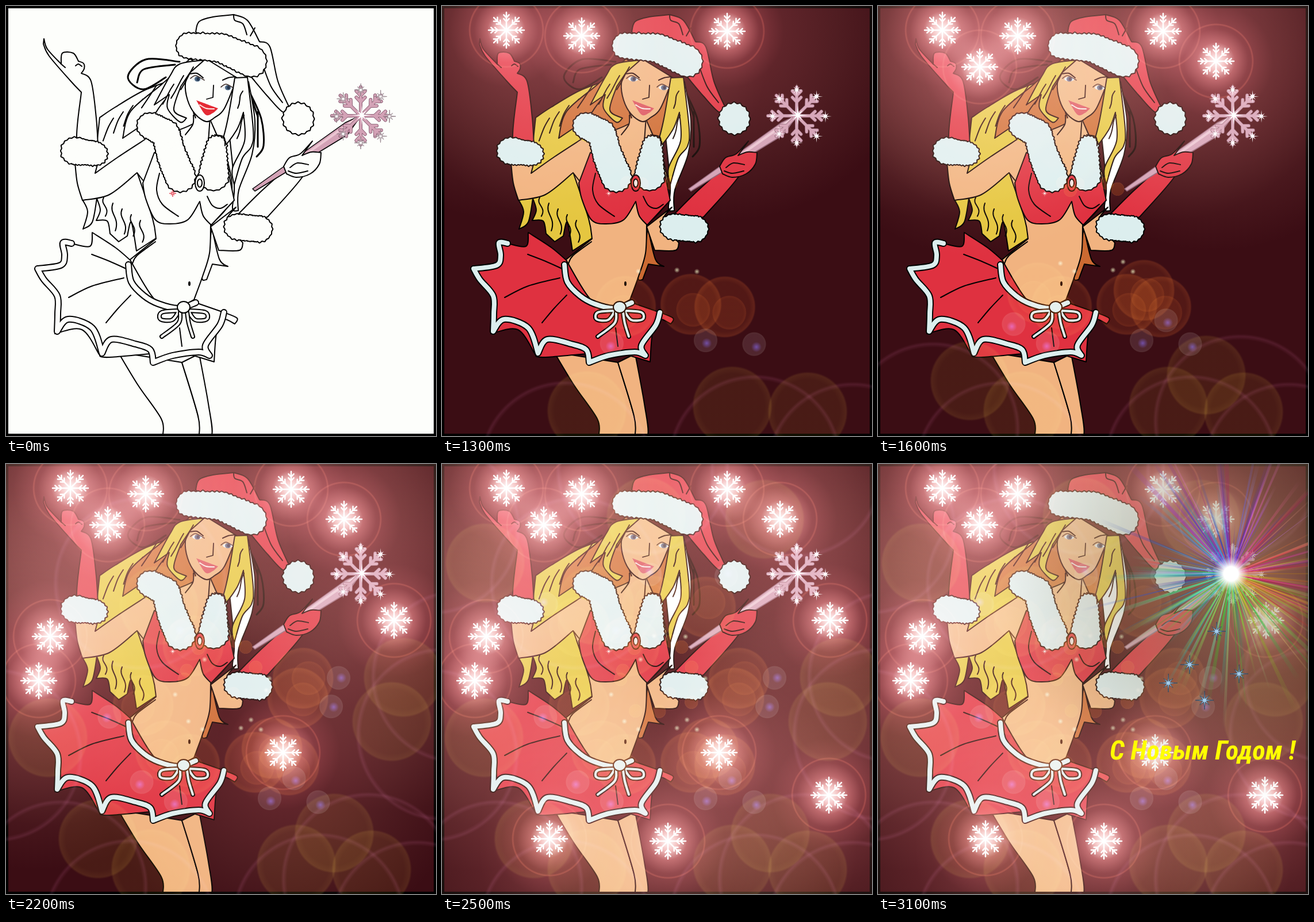
These frames come from a looping animation (748 by 748 pixels, 5.1 s). An HTML page with a canvas:

```html
<!DOCTYPE html>
<html lang="ru">
<head>
<meta charset="utf-8">
<title>С Новым Годом</title>
<style>
html, body { margin: 0; width: 100%; height: 100%; overflow: hidden; background: #000; }
#stage { position: fixed; inset: 0; overflow: hidden; }
canvas { display: block; width: 748px; height: 748px; }
#wish { position: absolute; left: 403px; top: 473px; line-height: 50px; white-space: nowrap; color: #ff0;
  font-family: "Roboto Condensed", "Open Sans Condensed", "Open Sans", sans-serif;
  font-style: italic; font-weight: 700; font-size: 40px; visibility: hidden; }
</style>
</head>
<body>
<div id="stage">
  <canvas width="748" height="748"></canvas>
  <div id="wish">С Новым Годом !</div>
</div>
<script>
const S = 748, LOOP = 5100, FIRST = 1000, STEP = 300, LAST = 8;
const BURST = 7;
const lit = [0, 0, 3, 5, 7, 9, 12, 12];
// Lit from the top of the picture downwards.
const flakes = [[112, 42], [243, 52], [496, 44], [588, 96], [177, 106], [675, 272], [77, 300],
  [57, 377], [482, 502], [673, 576], [187, 652], [393, 656]];
const RED = '#df3140', FUR = '#dceeee', SKIN = '#f1b380', GOLD = '#e5c640', BROWN = '#cb6a32';
const TAU = Math.PI * 2;
let g, inked, seed;

const rnd = () => (seed = (seed * 16807) % 2147483647) / 2147483647;
const tone = c => inked ? c : '#fdfefb';
const mix = (a, b, t) => a + (b - a) * t;

function points(s) {
  const n = s.trim().split(/\s+/).map(Number), out = [];
  for (let i = 0; i < n.length; i += 2) out.push([n[i], n[i + 1]]);
  return out;
}

// Smooth path through "x y x y"; a bar makes the point before it a sharp corner.
function trace(s) {
  const p = new Path2D();
  let last = null;
  for (const part of s.split('|')) {
    const r = points(part);
    if (last) r.unshift(last); else p.moveTo(...r[0]);
    last = r[r.length - 1];
    for (let i = 0; i + 1 < r.length; i++) {
      const a = r[i - 1] || r[i], b = r[i], c = r[i + 1], d = r[i + 2] || c;
      p.bezierCurveTo(b[0] + (c[0] - a[0]) / 6, b[1] + (c[1] - a[1]) / 6,
        c[0] - (d[0] - b[0]) / 6, c[1] - (d[1] - b[1]) / 6, c[0], c[1]);
    }
  }
  return p;
}

function line(s, w = 2, color = '#000') {
  g.lineWidth = w;
  g.strokeStyle = color;
  s.split('/').forEach(t => g.stroke(trace(t)));
}

function shape(s, fill, w = 2) {
  const p = trace(s);
  p.closePath();
  g.fillStyle = tone(fill);
  g.fill(p);
  if (w) { g.lineWidth = w; g.strokeStyle = '#000'; g.stroke(p); }
}

function band(s, w) {
  line(s, w + 4);
  line(s, w, tone(FUR));
}

// Ragged discs strung along a spine, outlined as one.
function fur(s, r0, r1) {
  const spine = points(s), tufts = [], n = (spine.length - 1) * 7;
  for (let i = 0; i <= n; i++) {
    const k = Math.min(Math.floor(i / 7), spine.length - 2), t = i / 7 - k;
    const [a, b] = [spine[k], spine[k + 1]], r = mix(r0, r1, i / n), p = new Path2D();
    for (let q = 0; q < 32; q++) {
      const d = r + (q % 2 ? 0 : 1 + rnd() * 2) - 1.5, v = q / 32 * TAU;
      p.lineTo(mix(a[0], b[0], t) + d * Math.cos(v), mix(a[1], b[1], t) + d * Math.sin(v));
    }
    p.closePath();
    tufts.push(p);
  }
  g.lineWidth = 4;
  g.strokeStyle = '#000';
  tufts.forEach(p => g.stroke(p));
  g.fillStyle = tone(FUR);
  tufts.forEach(p => g.fill(p));
}

function strands(n, x, y, stepX, stepY, dx, dy) {
  g.lineWidth = 2;
  g.strokeStyle = '#000';
  for (let i = 0; i < n; i++) {
    const k = mix(.7, 1.1, rnd()), u = x + stepX * i, v = y + stepY * i;
    g.beginPath();
    g.moveTo(u, v);
    g.bezierCurveTo(u + dx * .1 - 8, v + dy * .4 * k, u + dx * .9 + 9, v + dy * .5 * k, u + dx * k, v + dy * k);
    g.stroke();
  }
}

function oval(x, y, rx, ry, fill, w = 0) {
  g.beginPath();
  g.ellipse(x, y, rx, ry, 0, 0, TAU);
  g.fillStyle = fill;
  g.fill();
  if (w) { g.lineWidth = w; g.strokeStyle = '#000'; g.stroke(); }
}

function flake(x, y, r, color, w) {
  g.strokeStyle = color;
  g.lineWidth = w;
  for (let i = 0; i < 8; i++) {
    g.save();
    g.translate(x, y);
    g.rotate(i * TAU / 8);
    g.beginPath();
    g.moveTo(0, 0);
    g.lineTo(r, 0);
    for (const a of [.48, .7]) {
      g.moveTo(r * (a + .16), -r * .15);
      g.lineTo(r * a, 0);
      g.lineTo(r * (a + .16), r * .15);
    }
    g.stroke();
    g.restore();
  }
}

function star(x, y, r, fill, edge) {
  g.beginPath();
  for (let i = 0; i < 16; i++) {
    const a = i * TAU / 16, q = r * (i % 2 ? .2 : i % 4 ? .72 : 1);
    g.lineTo(x + q * Math.sin(a), y - q * Math.cos(a));
  }
  g.closePath();
  g.fillStyle = fill;
  g.fill();
  if (edge) { g.lineWidth = .8; g.strokeStyle = edge; g.stroke(); }
}

function hairBack() {
  line('302 97 243 93 212 123 238 145 278 124 / 294 102 240 110 228 133', 3);
  line('424 150 444 196 448 243 436 262 / 424 152 438 192 / 438 184 438 245', 3);
  shape('300 125 240 147 190 176 163 194 | 150 300 133 337 | 142 358 134 388 | 150 376 158 335 | 164 355 157 373 | 176 374 181 396 | 196 410 | 211 400 | 218 376 227 426 | 264 402 | 290 200', GOLD);
  strands(4, 238, 162, -17, 11, -22, 48);
  strands(5, 170, 333, 16, 10, 4, 46);
  shape('320 92 270 137 217 183 203 230 | 240 205 | 310 235 380 235 | 394 205 395 140', BROWN);
  strands(2, 262, 138, 14, 26, -24, 36);
  shape('400 125 422 132 | 433 200 428 258 405 320 404 356 | 394 352 397 310 386 200', '#fff');
  shape('358 384 371 440 386 453 | 359 449 | 349 476 | 341 471 354 415', BROWN);
}

function body() {
  shape('195 602 230 660 270 718 273 746 | 336 746 334 713 306 620', SKIN);
  shape('306 620 334 713 336 746 | 358 746 352 692 336 605', SKIN);
  shape('356 384 400 350 | 384 376 412 412 | 406 425 370 425', SKIN);
  shape('326 185 325 205 260 230 | 228 289 | 255 370 261 405 | 216 441 | 222 470 258 510 300 522 327 511 | 342 470 354 430 356 381 | 390 340 388 280 354 195', SKIN);
  shape('120 272 124 308 133 338 | 180 328 228 290 | 250 300 265 250 240 232 | 196 262 155 291 | 160 272', SKIN, 0);
  line('120 272 124 308 133 338 | 180 328 228 290 | 238 303 / 242 232 196 262 155 291 | 160 272');
  line('220 448 228 434 260 410');
  oval(319, 483, 2, 4, '#000');
  shape('258 255 238 308 | 243 335 260 372 285 379 316 372 337 340 | 343 365 357 381 | 397 338 | 384 275 | 350 285', RED);
  shape('318 240 337 315 352 235 354 196 326 196', SKIN, 0);
  line('326 190 325 206 312 224 / 355 193 352 235');
  line('267 291 262 320 272 345 300 366 / 350 331 359 347 373 352 385 345');
}

function skirt() {
  const hem = '114 413 99 412 102 434 95 451 55 457 | 66 476 89 504 90 535 89 566 | 108 545 150 560 167 604 | 183 580 225 588 251 598 256 620 | 290 608 335 602 354 608 | 347 590 372 555 379 533';
  const waist = '213 450 | 218 480 240 504 265 518 300 526 330 516';
  shape(hem + '| 402 543 398 553 | 377 545 366 570 362 619 | 300 600 | 180 611 162 606 | 132 563 85 570 | 100 460', RED);
  shape(hem + '| 330 516 |' + '300 522 260 512 216 442 | 190 420 150 394 | 146 418 114 413', RED);
  line('149 432 180 444 211 458 / 205 473 150 487 109 507 / 217 503 195 526 174 551 / 302 560 306 592');
  band(hem, 8);
  band(waist, 8);
  for (const m of [-1, 1]) {
    const at = (x, y) => `${309 + m * x} ${y} `;
    band(at(8, 530) + at(38, 533) + at(40, 545) + at(20, 546) + at(8, 530), 4);
    band(at(6, 533) + at(9, 552) + at(m < 0 ? 38 : 16, 575), 4);
  }
  oval(309, 524, 11, 10, tone(FUR), 2);
}

function face() {
  shape('321 112 312 135 316 164 329 188 348 201 363 194 380 178 402 125 | 345 90', SKIN);
  line('321 118 332 117 343 125 / 377 129 386 125 399 123');
  for (const [x, y] of [[333, 127], [386, 142]]) {
    oval(x, y, 9, 4, '#e8eef1');
    oval(x, y, 5, 4.5, '#4d6884');
    oval(x + 1, y, 2.5, 3, '#24344a');
    line(`${x - 12} ${y - 1} ${x - 3} ${y - 6} ${x + 12} ${y + 2}`, 1.6, '#3a2a26');
  }
  line('361 138 360 159 | 349 162', 1.8);
  g.fillStyle = inked ? '#d9505c' : '#e52b35';
  g.fill(trace('331 164 342 168 350 171 369 178 | 360 186 347 189 331 164'));
  line('337 172 348 178 362 179', 2, '#fbe8e4');
}

function locks() {
  shape('345 94 302 101 285 122 258 172 | 284 154 | 281 178 303 202 314 195 | 292 181 304 140 | 320 116', GOLD);
  strands(3, 326, 106, -17, 15, -20, 36);
  shape('398 125 386 196 375 236 366 228 | 375 248 401 216 413 185 | 415 235 394 282 397 311 | 411 265 427 244 430 214 420 124', GOLD);
  strands(2, 412, 148, 2, 42, -12, 40);
}

function clothes() {
  fur('250 208 278 222 288 260 303 297', 22, 26);
  fur('366 243 361 295', 17, 26);
  line('363 224 379 228 381 243');
  oval(337, 308, 8, 14, tone(RED), 2);
  oval(337, 308, 4, 7, tone('#f6e2df'), 2);
  shape('66 57 72 75 96 101 | 98 82 117 82 126 96 | 135 100 136 109 131 117 | 148 131 157 195 160 245 | 124 240 131 150 | 112 130 75 87 65 66', RED);
  line('96 101 103 107 / 121 104 126 101 132 105');
  fur('119 252 156 257', 23, 20);
  shape('330 45 336 27 360 19 396 15 | 420 25 441 62 | 459 71 473 131 494 179 | 481 184 455 157 428 125', RED);
  line('396 15 398 25 412 31 419 50 / 433 38 425 52 / 446 101 461 140 481 168');
  fur('318 69 375 73 426 96', 22, 27);
  fur('508 195 509 197', 26, 26);
}

function wand() {
  const edge = inked ? '#8b6274' : '#7a4a62', pink = '#d3a2b6';
  shape('404 362 440 326 484 286 | 520 290 455 367 | 430 375', RED);
  const p = trace('429 318 | 590 203 | 618 190 | 594 224 | 433 322 | 429 318');
  g.fillStyle = pink;
  g.fill(p);
  g.lineWidth = 1.5;
  g.strokeStyle = inked ? edge : '#000';
  g.stroke(p);
  line('500 273 612 194', 4, '#ebc6d2');
  shape('483 279 493 264 512 257 533 235 | 515 260 | 531 254 548 255 | 545 275 529 292 505 298 488 292', RED);
  line('494 281 507 273 526 276 / 491 287 505 291 525 287');
  fur('402 384 441 388', 22, 22);
  flake(617, 191, 50, edge, 6);
  flake(617, 191, 50, pink, 4.5);
  seed = 31;
  for (let i = 0; i < 8; i++) {
    const a = i * TAU / 8, r = 46 + 4 * Math.cos(a);
    star(617 + r * Math.cos(a), 192 + r * Math.sin(a), 11, '#fff', inked ? '' : '#8b7881');
  }
  star(619, 190, 17, '#fff');
  star(290, 326, 6, inked ? '#ffe8e4' : '#fff', inked ? '' : RED);
}

function figure() {
  seed = 77;
  g.fillStyle = inked ? '#3b0d14' : '#fdfefb';
  g.fillRect(0, 0, S, S);
  [hairBack, body, skirt, face, locks, clothes, wand].forEach(f => f());
  g.lineWidth = 8;
  g.strokeStyle = '#000';
  g.strokeRect(0, 0, S, S);
}

function glow(x, y, r, stops) {
  const f = g.createRadialGradient(x, y, 0, x, y, r);
  stops.forEach(([t, c]) => f.addColorStop(t, c));
  g.fillStyle = f;
  g.fillRect(x - r, y - r, r * 2, r * 2);
}

// Light at the flake, with its reflections on the line through the centre.
function flare([x, y]) {
  const at = k => [mix(S / 2, x, k), mix(S / 2, y, k)];
  const disc = (k, r, inner, rim) => glow(...at(k), r, [[0, inner], [.8, inner], [.95, rim], [1, '#000']]);
  const ring = (k, r, c) => glow(...at(k), r, [[0, '#000'], [.93, '#000'], [.97, c], [1, '#000']]);
  g.globalCompositeOperation = 'screen';
  glow(x, y, 330, [[0, '#fff'], [.05, '#eeb6b4'], [.1, '#9c5253'], [.17, '#582a2b'], [.3, '#2f1918'], [.6, '#1a100e'], [1, '#000']]);
  ring(1, 66, '#4c1a12');
  ring(-1.3, 152, '#1c0e16');
  disc(-1, 70, '#120f02', '#1e1806');
  disc(-.45, 54, '#1e0c02', '#321606');
  disc(-.48, 30, '#140802', '#220e04');
  disc(-.645, 21, '#1c1a1c', '#20201f');
  glow(...at(-.66), 9, [[0, '#303090'], [1, '#000']]);
  glow(...at(-.265), 5, [[0, '#b0b890'], [1, '#000']]);
  disc(.2, 12, '#321400', '#3a1a06');
  g.globalCompositeOperation = 'source-over';
}

function burst() {
  const x = 614, y = 191;
  seed = 4242;
  glow(x, y, 400, [[0, 'rgba(150,140,90,.5)'], [.4, 'rgba(110,100,60,.3)'], [1, 'rgba(110,100,60,0)']]);
  for (let i = 0; i < 420; i++) {
    const a = rnd() * TAU, w = .005 + rnd() * .016, r = 50 + rnd() ** 2 * 220;
    const hue = 20 + a / TAU * 340 + (rnd() - .5) * 130, light = 35 + rnd() * 35;
    const f = g.createRadialGradient(x, y, 0, x, y, r);
    f.addColorStop(0, `hsla(${hue},95%,${light + 12}%,.9)`);
    f.addColorStop(.4, `hsla(${hue},70%,${light}%,.5)`);
    f.addColorStop(1, `hsla(${hue},50%,${light}%,0)`);
    g.fillStyle = f;
    g.beginPath();
    g.moveTo(x, y);
    g.lineTo(x + r * Math.cos(a - w), y + r * Math.sin(a - w));
    g.lineTo(x + r * Math.cos(a + w), y + r * Math.sin(a + w));
    g.fill();
  }
  g.globalCompositeOperation = 'screen';
  glow(x, y, 30, [[0, '#fff'], [.42, '#fff'], [1, '#000']]);
  g.globalCompositeOperation = 'source-over';
  for (const [sx, sy] of [[589, 291], [542, 349], [505, 381], [568, 411], [628, 365]])
    star(sx, sy, 16, '#a5cdec', '#2c465c');
}

function render(i) {
  const c = document.createElement('canvas');
  c.width = c.height = S;
  g = c.getContext('2d');
  g.lineJoin = g.lineCap = 'round';
  inked = i > 0;
  figure();
  const on = flakes.slice(0, lit[i]);
  on.forEach(flare);
  on.forEach(([x, y]) => flake(x, y, 31, '#fff', 2.5));
  if (i === BURST) burst();
  return c;
}

const scenes = lit.map((_, i) => render(i));
const view = document.querySelector('canvas').getContext('2d');
const wish = document.getElementById('wish');
wish.style.fontSize = Math.min(54, 40 * 323 / wish.offsetWidth) + 'px';
let shown = -1;

function tick() {
  const t = performance.now() % LOOP;
  const i = t < FIRST ? 0 : Math.min(LAST, 1 + Math.floor((t - FIRST) / STEP));
  if (i !== shown) {
    view.drawImage(scenes[Math.min(i, BURST)], 0, 0);
    wish.style.visibility = i === LAST ? 'visible' : 'hidden';
    shown = i;
  }
  requestAnimationFrame(tick);
}
tick();
</script>
</body>
</html>
```
